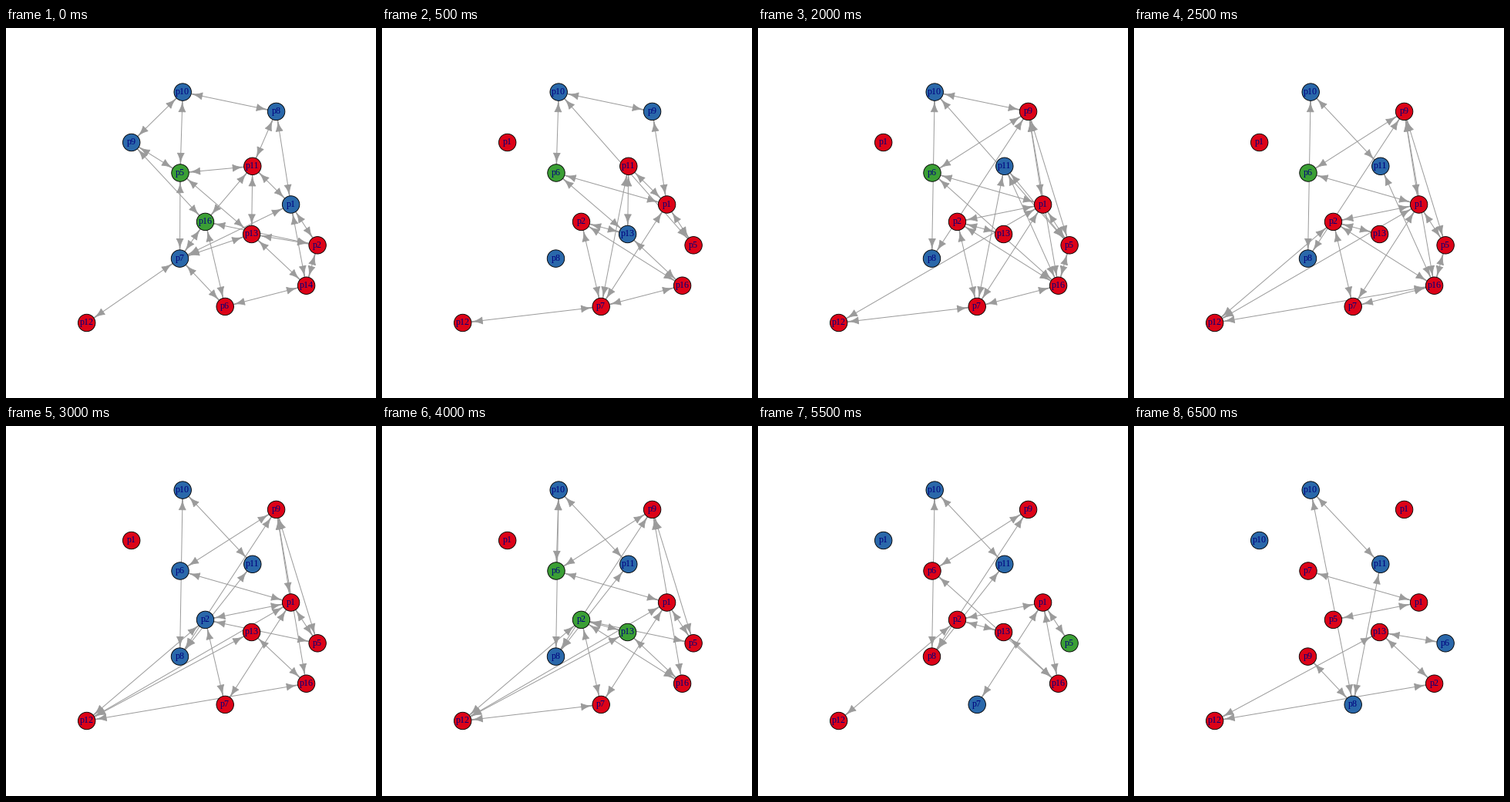
Recreate the animation shown at these times as a matplotlib script. Size 480 by 480 pixels, loop 7000 ms.

```python
import numpy as np
import matplotlib.pyplot as plt
from matplotlib.animation import FuncAnimation
from matplotlib.collections import LineCollection, PolyCollection

SIZE, DPI = 480, 72
RADIUS, HEAD = 11.22, 14.4
GREY, NAVY = "#9b9b9b", "#00007d"
FILL = {"R": "#dc0318", "B": "#2a68aa", "G": "#3b9f35"}

# Fixed places of the nodes A..M
NODES = dict(
    A=(229.2, 83.1), B=(162.7, 148.5), C=(350.6, 108.4), D=(226.0, 188.0),
    E=(319.8, 179.3), F=(369.6, 229.0), G=(258.5, 251.4), H=(318.6, 267.5),
    I=(404.1, 281.8), J=(225.5, 299.1), K=(389.6, 334.2), L=(284.2, 361.4),
    M=(104.7, 382.5))

NAMES = [
    "10 9 8 5 11 1 16 13 2 7 14 6 12".split(),
    "10 1 9 6 11 1 2 13 5 8 16 7 12".split(),
    "10 10 1 7 11 1 5 13 6 9 2 8 12".split(),
]

# Per step: label set, node colours, links dropped, links added
STEPS = [
    (0, "BBBGRBGRRBRRR", "",
     "AB AC AD BD BG CE CF DE DH DJ EG EH EF FI FK FJ GJ GL GI HI HJ HK "
     "IK JL JM KL"),
    (1, "BRBGRRRBRBRRR",
     "AB BD BG CE DE DJ EG FK FJ GJ GI HI HJ IK JL JM",
     "AI DF LM EL GK FL GH"),
    (1, "BRBGRRRBRBRRR", "DH FI HK",
     "AJ CD CJ CH CI CK DK EI EK FG GM HL IL"),
    (1, "BRRGRRRBRBRRR", "GM IL CH EH EF HL", ""),
    (1, "BRRGBRRRRBRRR", "AD", "FM FI IK"),
    (1, "BRRGBRRRRBRRR", "AC AI LM EI DK EL", "AE GM KM"),
    (1, "BRRBBRBRRBRRR", "EK GH GK IK KL", "EJ GI HM HK"),
    (1, "BRRBBRGRRBRRR", "KM", "LM GK"),
    (1, "BRRGBRGGRBRRR", "CF FG", "AD GH"),
    (1, "BRRRBRGRRBRRR", "AD CK HM LM HK", "DK"),
    (1, "BBRRBRRRGRRBR", "DF GI GK GL", "DH FK"),
    (1, "BBRRBRRRGRRBR", "CI DH FM", "FG HK"),
    (2, "BBRRBRRRRRRBR", "AJ CD CJ DK EJ FI FK FL GH GM",
     "AL DF EL JL KM"),
    (2, "BBRRBRRRBRRBR", "", "HM HI"),
]


def link_sets():
    current, result = set(), []
    for _, _, drop, add in STEPS:
        current = (current - set(drop.split())) | set(add.split())
        result.append(sorted(current))
    return result


LINKS = link_sets()


def arrow(tip, way):
    """Needle-pointed head: its half width grows with the square of x."""
    x = np.sqrt(np.linspace(0, HEAD ** 2, 9))
    y = 0.3 / HEAD * x ** 2 + 0.07
    x, y = np.r_[x[::-1], x], np.r_[-y[::-1], y]
    side = np.array([-way[1], way[0]])
    return tip + np.outer(x, way) + np.outer(y, side)


def link_shapes(links):
    lines, heads = [], []
    for a, b in links:
        p, q = np.array(NODES[a]), np.array(NODES[b])
        way = (q - p) / np.hypot(*(q - p))
        p, q = p + RADIUS * way, q - RADIUS * way
        lines.append([p, q])
        heads += [arrow(p, way), arrow(q, -way)]
    return lines, heads


fig = plt.figure(figsize=(SIZE / DPI, SIZE / DPI), dpi=DPI, facecolor="white")
ax = fig.add_axes([0, 0, 1, 1])
ax.set_xlim(0, SIZE)
ax.set_ylim(SIZE, 0)
ax.axis("off")

edges = LineCollection([], colors=GREY, linewidths=1, zorder=1)
tips = PolyCollection([], facecolors=GREY, edgecolors=GREY, linewidths=0.9,
                      zorder=2)
ax.add_collection(edges, autolim=False)
ax.add_collection(tips, autolim=False)

discs, texts = [], []
for x, y in NODES.values():
    disc = plt.Circle((x, y), RADIUS, ec="black", lw=0.9, zorder=3)
    discs.append(ax.add_patch(disc))
    texts.append(ax.text(x, y + 2.8, "", family="Liberation Serif",
                         size=12, color=NAVY, ha="center", va="baseline",
                         zorder=4))


def draw(step):
    names, colours = STEPS[step][:2]
    lines, heads = link_shapes(LINKS[step])
    edges.set_segments(lines)
    tips.set_verts(heads)
    for disc, text, name, key in zip(discs, texts, NAMES[names], colours):
        disc.set_facecolor(FILL[key])
        text.set_text("p" + name)
    return [edges, tips, *discs, *texts]


anim = FuncAnimation(fig, draw, frames=len(STEPS), interval=500,
                     init_func=lambda: draw(0), repeat=True, repeat_delay=0)
plt.show()
```
